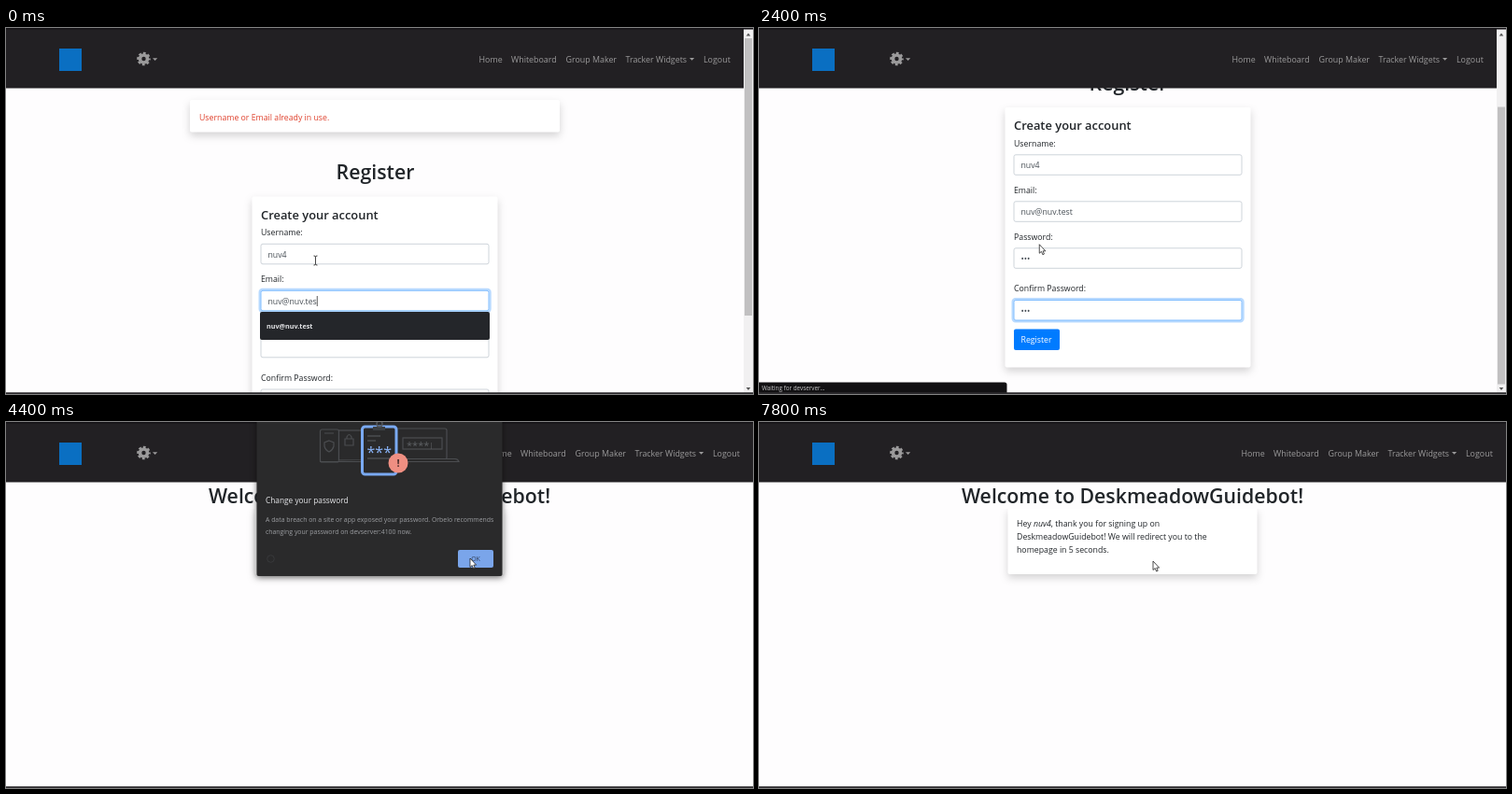
Recreate the animation shown at these times as an HTML page. Size 800 by 392 pixels, loop 8 s.

```html
<!DOCTYPE html>
<html lang="en">
<head>
<meta charset="utf-8">
<title>Register</title>
<style>
  html, body { margin: 0; width: 100%; height: 100%; overflow: hidden; background: #fefdfe; }
  svg { display: block; width: 100%; height: 100%; font: 8.75px "Open Sans", "Noto Sans", sans-serif; fill: #212529; }
  .card { fill: #fff; filter: drop-shadow(0 4px 4.5px rgba(0, 0, 0, .17)); }
  .title { font-size: 21.3px; font-weight: 600; text-anchor: middle; }
  .subtitle { font-size: 12.9px; font-weight: 600; }
  .box { fill: #fff; stroke: #ced4da; }
  .ring { fill: none; stroke: #007bff; stroke-opacity: .28; stroke-width: 2.4; }
  .value { fill: #495057; }
  .focus .box { stroke: #80bdff; }
  .field:not(.focus) .ring { display: none; }
  .nav { fill: #9b9a9b; font-size: 8.9px; }
  .line { fill: #2a2a2b; stroke: #4b4d50; stroke-width: 1.2; }
</style>
</head>
<body>
<svg viewBox="0 0 800 392">
  <rect width="800" height="392" fill="#fefdfe"/>

  <g id="register">
    <g id="form">
      <rect class="card" x="197" y="77" width="396" height="34.5" rx="2"/>
      <text x="207" y="98.5" fill="#df402c">Username or Email already in use.</text>
      <text class="title" x="395.5" y="162">Register</text>
      <rect class="card" x="263.5" y="180.5" width="263" height="278.5" rx="2"/>
      <text class="subtitle" x="273" y="204.5">Create your account</text>
      <g id="fields"></g>
      <rect x="273" y="418" width="49" height="22.5" rx="2" fill="#007bff"/>
      <text x="280.5" y="432.5" fill="#fff">Register</text>
      <path id="caret" stroke="#333" stroke-width=".8"/>
      <g id="suggest">
        <rect x="272" y="304" width="246" height="30" rx="2" fill="#24262a"/>
        <text x="279" y="321.7" font-size="7.2" font-weight="700" fill="#e4e5e7">nuv@nuv.test</text>
      </g>
    </g>
    <rect x="790" width="10" height="392" fill="#f1f0f1"/>
    <rect id="thumb" x="791" width="8" height="297" fill="#c1c0c1"/>
    <path d="M792.7 8.5l2.3-3 2.3 3zM792.7 385l2.3 3 2.3-3z" fill="#555"/>
    <g id="status">
      <path d="M0 379.500H263q2.500 0 2.500 2.500V391H0z" fill="#121113"/>
      <text x="3" y="388" font-size="6.3" fill="#c9c9ca">Waiting for devserver...</text>
    </g>
  </g>

  <g id="welcome">
    <rect class="card" x="266.500" y="92" width="267" height="71" rx="2"/>
    <rect x="205" y="65" width="390" height="28" fill="#fefdfe"/>
    <text class="title" x="400" y="87">Welcome to DeskmeadowGuidebot!</text>
    <text x="276" y="112.300">Hey <tspan font-style="italic">nuv4</tspan>, thank you for signing up on</text>
    <text x="276" y="126.300">DeskmeadowGuidebot! We will redirect you to the</text>
    <text x="276" y="140.300">homepage in 5 seconds.</text>
  </g>

  <rect id="bar" height="64.500" fill="#222023"/>
  <rect x="57" y="22" width="24" height="24" fill="#0a6fc2"/>
  <g fill="none" stroke="#9b9a9b">
    <circle cx="147.500" cy="33" r="4" stroke-width="3.600"/>
    <circle cx="147.500" cy="33" r="6" stroke-width="2.600" stroke-dasharray="2.700 2.012" stroke-dashoffset="1.350"/>
  </g>
  <path d="M157 32.300h5.200l-2.600 2.700z" fill="#9b9a9b"/>
  <g class="nav" id="links">
    <text x="506.500" y="36.700">Home</text>
    <text x="541" y="36.700">Whiteboard</text>
    <text x="599.500" y="36.700">Group Maker</text>
    <text x="663.500" y="36.700">Tracker Widgets</text>
    <path d="M732 32h5.200l-2.600 2.700z"/>
    <text x="747" y="36.700">Logout</text>
  </g>
  <path d="M0 0H800V1.500H0z" fill="#141216"/>
  <path d="M0 390.300H800V392H0z" fill="#2b2a2d"/>

  <g id="dialog">
    <rect x="268.500" y="-5" width="263" height="170" rx="2" fill="#2a2a2b" style="filter:drop-shadow(0 1px 3px #0008)"/>
    <g class="line">
      <rect x="336.500" y="8" width="20" height="35" rx="2"/>
      <path d="M341 12h10M346 20l5 2v4q-1 4-5 6q-4-2-5-6v-4z"/>
      <rect x="356.500" y="9" width="26" height="32"/>
      <path d="M363 18h9v7h-9zM365 18v-2q2.500-5 5 0v2"/>
      <rect x="417" y="7" width="55" height="33" rx="2"/>
      <path d="M336 42.500H485q-1-3-4-3H416"/>
      <rect x="425" y="17" width="42" height="12"/>
    </g>
    <text x="429" y="29" font-size="11" fill="#5f6266">****<tspan dy="-2.500" font-size="8">|</tspan></text>
    <rect x="381.500" y="5" width="36.500" height="51" rx="3" fill="#2a2a2b" stroke="#7aaaf3" stroke-width="3"/>
    <path d="M393 9V5h13v4z" fill="#3c4044"/>
    <circle cx="400" cy="2" r="3" fill="none" stroke="#55595e" stroke-width="1.500"/>
    <path d="M387 15h14M387 20h9M387 39h26" stroke="#5b5e63"/>
    <text x="386.500" y="38" font-size="16" fill="#8ab4f8">***</text>
    <circle cx="420" cy="44" r="10.500" fill="#ef8f82"/>
    <text x="420" y="48" font-size="11" font-weight="700" text-anchor="middle" fill="#4a2c2a">!</text>
    <text x="278" y="87" font-size="8.300" fill="#e6e7ea">Change your password</text>
    <g font-size="6.900" fill="#9c9ea2">
      <text x="278" y="107.300">A data breach on a site or app exposed your password. Orbelo recommends</text>
      <text x="278" y="119.500">changing your password on devserver:4100 now.</text>
    </g>
    <circle cx="283.500" cy="146.500" r="3.800" fill="none" stroke="#38393b"/>
    <rect x="484" y="137" width="38" height="19" rx="2" fill="#7aa5ea"/>
    <text x="503" y="149" font-size="7" text-anchor="middle" fill="#33415c">OK</text>
  </g>

  <path id="arrow" d="M0 0V9.500L2.200 7.600 3.600 11 5.200 10.300 3.800 7.100H6.600z" fill="#fff" stroke="#222" stroke-width=".8"/>
  <path id="beam" d="M-2-5Q0-5 0-4Q0-5 2-5M0-4V4M-2 5Q0 5 0 4Q0 5 2 5" fill="none" stroke="#333" stroke-width=".9"/>
</svg>
<script>
const LOOP = 8000, STEP = 200, INPUT_X = 280.5;
const $ = id => document.getElementById(id);
const show = (id, on) => { $(id).style.display = on ? '' : 'none'; };
const move = (id, x, y) => $(id).setAttribute('transform', `translate(${x} ${y})`);

const rows = [['Username:', 231], ['Email:', 281], ['Password:', 331], ['Confirm Password:', 386.7]];
$('fields').innerHTML = rows.map(([label, y]) => `<g class="field">
  <text x="273" y="${y - 9}">${label}</text>
  <rect class="ring" x="271.700" y="${y - 1}" width="246.800" height="24" rx="3"/>
  <rect class="box" x="273" y="${y + .3}" width="244" height="21.500" rx="2"/>
  <text class="value" x="${INPUT_X}" y="${y + 14.500}"></text></g>`).join('');
const fields = [...document.querySelectorAll('.field')];
const values = fields.map(f => f.querySelector('.value'));

// Piecewise linear track of [time, ...values]
function track(keys, t) {
  const i = keys.findIndex(k => k[0] > t);
  if (i < 0) return keys.at(-1).slice(1);
  if (!i) return keys[0].slice(1);
  const a = keys[i - 1], b = keys[i], p = (t - a[0]) / (b[0] - a[0]);
  return a.slice(1).map((v, n) => v + (b[n + 1] - v) * p);
}

const scrollKeys = [[800, 0], [1000, 17], [2000, 17], [2400, 95.5]];
const cursorKeys = [
  [0, 331.5, 249], [1800, 331, 248], [2200, 318, 240], [3000, 247, 207], [3200, 247, 207],
  [3800, 275, 91], [4300, 497, 146], [4400, 497, 146], [4800, 341.5, 128],
  [5200, 352, 130], [6600, 422, 149]
];
const dots = (t, start) => '•'.repeat(Math.max(0, Math.min(3, (t - start) / STEP + 1)));

function draw(t) {
  const registering = t < 3400;
  const [scroll] = track(scrollKeys, t);
  show('register', registering);
  show('welcome', !registering);
  move('form', 0, -scroll);
  $('thumb').setAttribute('y', 11 + scroll * .77);
  show('status', t >= 2400);
  show('suggest', t < 400);
  $('bar').setAttribute('width', registering ? 790 : 800);
  move('links', registering ? 0 : 10, 0);

  const focus = t < 400 ? 1 : t < 1000 ? 2 : 3;
  fields.forEach((f, i) => f.classList.toggle('focus', i === focus));
  ['nuv4', t < 200 ? 'nuv@nuv.tes' : 'nuv@nuv.test', dots(t, 400), dots(t, 1000)]
    .forEach((text, i) => { values[i].textContent = text; });
  show('caret', t < 400);
  if (t < 400) {
    const x = INPUT_X + values[1].getComputedTextLength() + .5;
    $('caret').setAttribute('d', `M${x} 287V298`);
  }

  show('dialog', t >= 4000 && t < 4600);
  const [x, y] = track(cursorKeys, t);
  const overText = t < 1000 || (t >= 4800 && t < 5600);
  show('beam', overText);
  show('arrow', !overText);
  move('beam', x, y);
  move('arrow', x, y);
}

function tick(now) {
  draw(Math.floor(now % LOOP / STEP) * STEP);
  requestAnimationFrame(tick);
}
draw(0);
requestAnimationFrame(tick);
</script>
</body>
</html>
```
